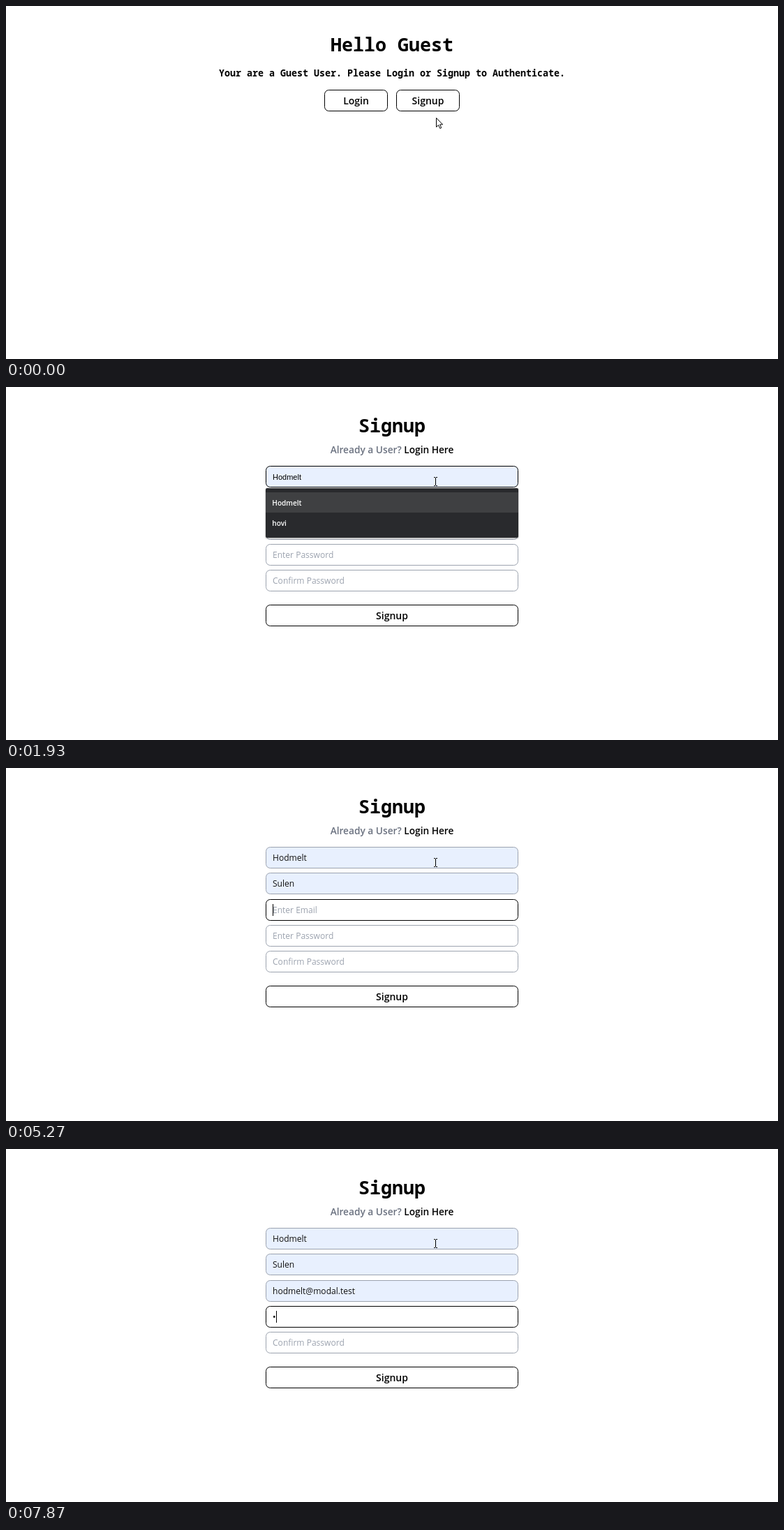
These frames come from a looping animation (1106 by 506 pixels, 8 s). An HTML page:

```html
<!DOCTYPE html>
<html lang="en">
<head>
<meta charset="utf-8">
<title>Signup form</title>
<style>
html, body { margin: 0; width: 100%; height: 100%; overflow: hidden; background: #fff; }
svg { display: block; }
text { font-family: "Open Sans", "Noto Sans", sans-serif; font-size: 12.05px; white-space: pre; }
.mid { text-anchor: middle; }
.title, .lead { font-family: "Noto Sans Mono", "DejaVu Sans Mono", monospace; font-weight: 700; text-anchor: middle; }
.title { font-size: 26.67px; }
.lead { font-size: 13.33px; }
.link { font-size: 13.7px; font-weight: 600; }
.label { font-size: 14px; font-weight: 600; text-anchor: middle; }
.hint { fill: #9ca3af; }
.value { fill: #111; }
.preview { font-family: "Liberation Sans", Arial, sans-serif; font-size: 11px; }
.item { font-size: 10.1px; font-weight: 600; fill: #fff; }
.menu { filter: drop-shadow(0 1px 1px rgba(0, 0, 0, .4)); }
.cursor { fill: #fff; stroke: #000; stroke-linejoin: round; }
</style>
</head>
<body>
<svg id="stage" width="1106" height="506" viewBox="0 0 1106 506"></svg>
<script>
const LOOP = 8000;
const stage = document.getElementById('stage');

const first = 'Hodmelt', last = 'Sulen', mail = 'hodmelt@modal.test';
const mails = [mail, 'hodmelt@moda.test'];
const moreMails = [...mails, 'hilvo@modal.test', 'hubren@modal.test', 'hexto@modal.test', 'hyldan@modal.test'];
const hints = ['Enter First Name', 'Enter Last Name', 'Enter Email', 'Enter Password', 'Confirm Password'];
const tops = [113, 150, 188, 225, 262];
const menuTops = [145, 182, 220];

// Each cue changes part of the state from its time on.
const cues = [
  [0, { page: 'home', cursor: ['arrow', 616, 160], values: [], filled: 0, focus: -1 }],
  [70, { cursor: ['arrow', 617, 153] }],
  [130, { cursor: ['hand', 619, 144], hover: true }],
  [200, { cursor: ['hand', 621, 137] }],
  [600, { page: 'form' }],
  [870, { cursor: ['hand', 619, 136] }],
  [930, { cursor: ['hand', 617, 135] }],
  [1000, { cursor: ['beam', 615, 135] }],
  [1400, { focus: 0, caret: 382 }],
  [1470, { menu: [first, 'hovi'] }],
  [1800, { hot: true, preview: first, caret: 0 }],
  [2130, { menu: null, hot: false, preview: '', values: [first], filled: 1, caret: 431 }],
  [2400, { focus: 1, caret: 382 }],
  [2930, { caret: 0 }],
  [3330, { values: [first, 'S'], caret: 388 }],
  [3400, { menu: [last] }],
  [3870, { hot: true, preview: last, caret: 0 }],
  [4200, { menu: null, hot: false, preview: '', values: [first, last], filled: 2, caret: 414 }],
  [4730, { caret: 0 }],
  [5200, { focus: 2, caret: 382 }],
  [5800, { caret: 0 }],
  [6130, { values: [first, last, 'h'], caret: 389, menu: moreMails }],
  [6270, { values: [first, last, 'ho'], caret: 396, menu: mails }],
  [6730, { hot: true, preview: mail, caret: 0 }],
  [7000, { menu: null, hot: false, preview: '', values: [first, last, mail], filled: 3, caret: 501 }],
  [7270, { focus: 3, caret: 382 }],
  [7800, { caret: 0 }],
  [7870, { values: [first, last, mail, '•'], caret: 387 }]
];

const text = (x, y, cls, str) => `<text x="${x}" y="${y}" class="${cls}">${str}</text>`;
const rect = (x, y, w, h, fill) => `<rect x="${x}" y="${y}" width="${w}" height="${h}" fill="${fill}"/>`;
const box = (x, y, w, line, fill = '#fff') =>
  `<rect x="${x + .5}" y="${y + .5}" width="${w - 1}" height="30" rx="6" fill="${fill}" stroke="${line}"/>`;
const button = (x, y, w, str, fill) => box(x, y, w, '#000', fill) + text(x + w / 2, y + 21, 'label', str);

const shapes = {
  arrow: 'M.5 .5V13.5L3.5 10.7 5.8 15.5 7.8 14.6 5.6 9.9H9.6Z',
  hand: 'M-1.5 9V1a1.5 1.5 0 0 1 3 0V6l5 1q2 .5 2 2.5v3l-1.5 4h-7l-4.5-6q-.5-2 1.5-1.5z',
  beam: 'M-2-5.5h2m1 0h2M.5-5v11M-2 6.5h2m1 0h2'
};
const cursor = ([kind, x, y]) =>
  `<path class="cursor" transform="translate(${x} ${y})" d="${shapes[kind]}"/>`;

function home(s) {
  return text(553, 65, 'title', 'Hello Guest')
    + text(553, 101, 'lead', 'Your are a Guest User. Please Login or Signup to Authenticate.')
    + button(456, 120, 91, 'Login')
    + button(559, 120, 91, 'Signup', s.hover ? '#f3f4f6' : '#fff');
}

function field(s, i) {
  const y = tops[i], active = i === s.focus;
  const shown = active && s.preview;
  const str = shown || s.values[i];
  const fill = shown || i < s.filled ? '#e8f0fe' : '#fff';
  return box(372, y, 362, active ? '#000' : '#9ca3af', fill)
    + text(382, y + 20.4, shown ? 'preview' : str ? 'value' : 'hint', str || hints[i])
    + (active && s.caret ? rect(s.caret, y + 7, 1, 17, '#000') : '');
}

function menu(s) {
  if (!s.menu) return '';
  const y = menuTops[s.focus], n = s.menu.length;
  return `<rect class="menu" x="372" y="${y}" width="362" height="${13 + 29 * n}" rx="2" fill="#292a2d"/>`
    + (s.hot ? rect(372, y + 6, 362, 29, '#3f4042') : '')
    + s.menu.map((m, i) => text(381.3, y + 24.8 + 29 * i, 'item', m)).join('');
}

function form(s) {
  return text(553, 65, 'title', 'Signup')
    + text(553, 95, 'link mid', '<tspan fill="#6b7280">Already a User?</tspan> Login Here')
    + hints.map((_, i) => field(s, i)).join('')
    + button(372, 312, 362, 'Signup')
    + menu(s);
}

let shownCue = -1;
function draw(now) {
  const t = now % LOOP;
  const past = cues.filter(c => c[0] <= t);
  if (past.length !== shownCue) {
    shownCue = past.length;
    const s = Object.assign({}, ...past.map(c => c[1]));
    stage.innerHTML = (s.page === 'home' ? home(s) : form(s)) + cursor(s.cursor);
  }
}

const start = performance.now();
function tick() {
  draw(performance.now() - start);
  requestAnimationFrame(tick);
}
tick();
</script>
</body>
</html>
```
